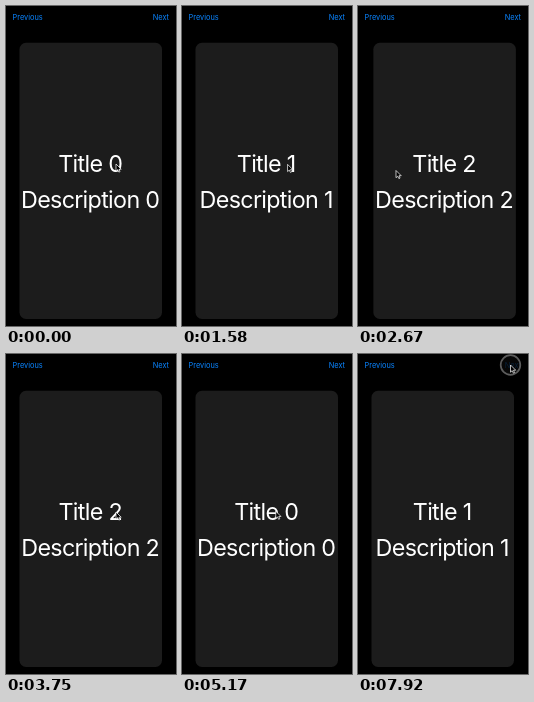
Write an HTML page that moves like this. It is 170x320 px and loops after 8000 ms.

```html
<!DOCTYPE html>
<html lang="en">
<head>
<meta charset="utf-8">
<title>Card pager</title>
<style>
  html, body { margin: 0; width: 100%; height: 100%; overflow: hidden; background: #000; }
  svg { display: block; width: 170px; height: 320px; }
  text { font-family: Inter, Roboto, sans-serif; font-optical-sizing: none; }
  #cards rect { fill: #1c1c1c; }
  #cards text { font-size: 23.3px; letter-spacing: -.029em; fill: #fff; text-anchor: middle; }
  .link { font-size: 7.4px; fill: #0a84ff; }
</style>
</head>
<body>
<svg viewBox="0 0 170 320">
  <rect width="170" height="320"/>
  <g id="cards"></g>
  <text class="link" x="6.5" y="14">Previous</text>
  <text class="link" id="next" x="163" y="14" text-anchor="end">Next</text>
  <g id="pointer">
    <circle id="ring" r="9.8" fill="#888" fill-opacity=".05" stroke="#5c5c5c" stroke-width="1.7"/>
    <path transform="scale(.9)" d="M0 0V8L1.9 6.3L3.2 9L4.5 8.4L3.3 5.8H5.8Z" fill="#000" stroke="#fff" stroke-width=".8"/>
  </g>
</svg>
<script>
const LOOP = 8000, FPS = 12, PAGE = 170;
const $ = id => document.getElementById(id);

const home = { x: 110, y: 158 };
const button = { x: 152.5, y: 11 };

// A swipe drags the pointer from home to (x, y) while the page turns
const swipes = [
  { start: 340, length: 790, x: 69, y: 161.5 },
  { start: 2160, length: 540, x: 38, y: 164.5 },
  { start: 4085, length: 540, x: 57, y: 155.5 }
];
const clicks = [6580, 7830];
const turns = [...swipes, { start: clicks[0] + 79, length: 415 }];

const progress = (t, start, length) => Math.min(1, Math.max(0, (t - start) / length));
const smooth = p => p * p * (3 - 2 * p);
const easeOut = p => p * (2 - p);
const during = (t, start, length) => t >= start && t < start + length;

function pointerAt(t) {
  const pos = { ...home };
  const pull = (to, amount) => {
    pos.x += (to.x - home.x) * amount;
    pos.y += (to.y - home.y) * amount;
  };
  for (const s of swipes) {
    const out = smooth(progress(t, s.start, 240));
    const back = easeOut(progress(t, s.start + 760, 720));
    pull(s, out - back);
  }
  pull(button, smooth(progress(t, 5670, 830)));
  return pos;
}

$('cards').innerHTML = [0, 1, 2, 0, 1].map((n, i) => `
  <g transform="translate(${i * PAGE})">
    <rect x="13.5" y="36.8" width="142.5" height="276.2" rx="6.5"/>
    <text x="84.2" y="165.7">Title ${n}</text>
    <text x="84.2" y="202">Description ${n}</text>
  </g>`).join('');

function draw(now) {
  // The picture advances in steps of 1/12 s
  const t = Math.floor((now % LOOP) * FPS / 1000 + .05) * 1000 / FPS % LOOP;
  const page = turns.reduce((sum, { start, length }) => sum + smooth(progress(t, start, length)), 0);
  const { x, y } = pointerAt(t);
  const dragging = swipes.some(s => during(t, s.start - 180, 340));
  const clicking = clicks.some(c => during(t, c, 120));
  const dimmed = clicks.some(c => during(t, c + 60, 60));
  $('cards').setAttribute('transform', `translate(${-page * PAGE})`);
  $('pointer').setAttribute('transform', `translate(${x} ${y})`);
  $('ring').setAttribute('visibility', dragging || clicking ? 'visible' : 'hidden');
  $('next').setAttribute('opacity', dimmed ? .2 : 1);
}

const origin = performance.now();
function tick() {
  draw(performance.now() - origin);
  requestAnimationFrame(tick);
}
tick();
</script>
</body>
</html>
```
